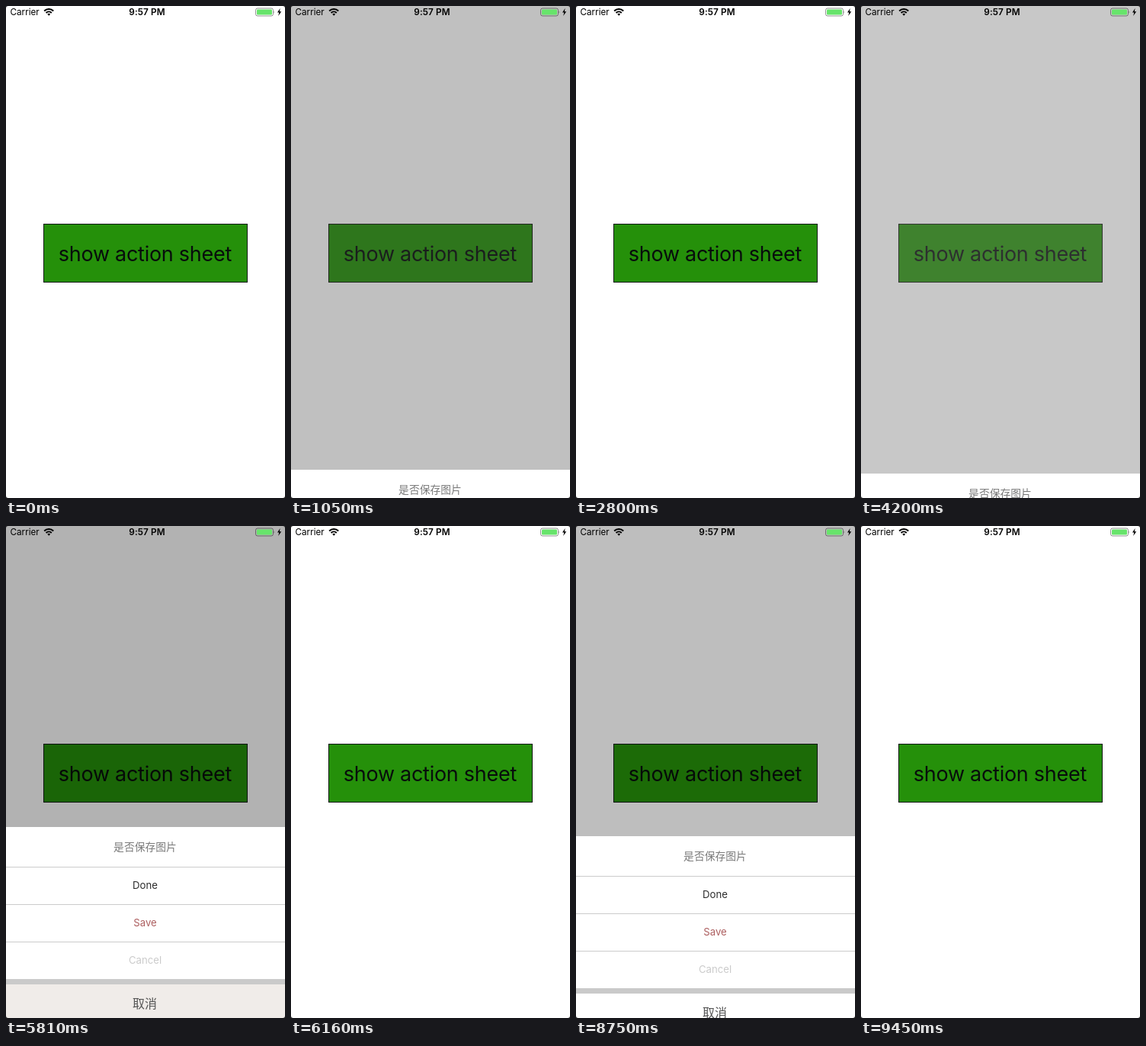
These frames come from a looping animation (366x644 px, 9.73 s). An HTML page:

```html
<!DOCTYPE html>
<html lang="en">
<head>
<meta charset="utf-8">
<title>Action sheet</title>
<style>
  html, body { margin: 0; width: 100%; height: 100%; overflow: hidden; background: #fff; }
  svg { display: block; width: 366px; height: 644px; }
  text { font-family: Inter, "Noto Sans CJK SC", "Noto Sans CJK", sans-serif; }
  .mid { text-anchor: middle; }
  .row { font-size: 13.2px; }
</style>
</head>
<body>
<svg viewBox="0 0 366 644">
  <rect width="366" height="644" fill="#fff"/>
  <g id="button">
    <rect x="49.5" y="285.5" width="267" height="76" fill="#25900a" stroke="#000" stroke-opacity=".88"/>
    <text class="mid" x="182.4" y="334" font-size="27" letter-spacing="-.28" fill="#080d0c">show action sheet</text>
  </g>
  <rect id="dim" width="366" height="644"/>

  <g id="sheet">
    <rect y="394" width="366" height="250" fill="#fff"/>
    <rect id="doneDown" y="447" width="366" height="48" fill="#f0ece9"/>
    <rect id="closeDown" y="600" width="366" height="44" fill="#f0ece9"/>
    <path d="M0 446.5H366M0 495.5H366M0 544.5H366" stroke="#ccc"/>
    <rect y="593" width="366" height="7" fill="#cacaca"/>
    <text class="mid" x="182.5" y="425.3" font-size="13.8" fill="#7a7a7a">是否保存图片</text>
    <text class="mid row" x="182.5" y="475" fill="#2c2c2c">Done</text>
    <text class="mid row" x="182.5" y="524" fill="#ad5f60">Save</text>
    <text class="mid row" x="182.5" y="573" fill="#cbcbcb">Cancel</text>
    <text class="mid" x="182" y="631" font-size="16" fill="#555">取消</text>
  </g>

  <g id="status">
    <text x="5.5" y="12" font-size="11.7">Carrier</text>
    <g fill="none" stroke="#000" stroke-width="2">
      <path d="M50.2 6.5A8.3 8.3 0 0 1 62.2 6.5M52.6 9A5.1 5.1 0 0 1 59.8 9"/>
    </g>
    <path d="M54.3 10.7a2.7 2.7 0 0 1 3.8 0L56.2 12.7z"/>
    <text class="mid" x="185" y="12" font-size="11.8" font-weight="600" letter-spacing=".1">9:57 PM</text>
    <rect x="327.5" y="3" width="23" height="10" rx="2.5" fill="none" stroke="#000" stroke-opacity=".42"/>
    <rect x="329" y="4.5" width="20" height="7" rx="1.2" fill="#67e46b"/>
    <path d="M351.5 6.3q1.6 1.7 0 3.4z" fill-opacity=".45"/>
    <path d="M359.6 3L356 8.4H358.3L357.2 13L361.2 7.2H358.8z"/>
  </g>
  <path fill="#222" fill-rule="evenodd" d="M0 0H366V644H0zM3 0Q0 0 0 3V641Q0 644 3 644H363Q366 644 366 641V3Q366 0 363 0z"/>
</svg>
<script>
const LOOP = 9730, TICK = 70;
// press: finger down, release: finger up, slide: sheet starts, close: sheet leaves
const runs = [
  { press: 770, release: 867, slide: 998, close: 2480 },
  { press: 3920, release: 4038, slide: 4152, close: 5885 },
  { press: 7000, release: 7085, slide: 7210, close: 8710 }
];
const el = id => document.getElementById(id);
const button = el('button'), dim = el('dim'), sheet = el('sheet');
const progress = (t, start, length) => Math.min(1, Math.max(0, (t - start) / length));
const ease = p => p < .5 ? 2 * p * p : 1 - 2 * (1 - p) ** 2;
const showBetween = (id, t, from, to) =>
  el(id).setAttribute('visibility', t >= from && t < to ? 'visible' : 'hidden');

function draw(t) {
  const run = runs.findLast(r => t >= r.press);
  let opacity = 1, shade = 0, raised = 0;
  if (run) {
    const closing = progress(t, run.close, 260);
    opacity = .2 + .8 * ease(progress(t, run.release, 250));
    shade = progress(t, run.release, 225) * (1 - closing);
    raised = ease(progress(t, run.slide, 190)) * (1 - ease(closing));
  }
  button.setAttribute('opacity', opacity);
  dim.setAttribute('opacity', .302 * shade);
  sheet.setAttribute('transform', `translate(0 ${Math.round(250 * (1 - raised))})`);
  showBetween('doneDown', t, 2310, 2590);
  showBetween('closeDown', t, 5810, 6020);
}

function frame() {
  const t = performance.now() % LOOP;
  draw(Math.floor(t / TICK) * TICK);
  requestAnimationFrame(frame);
}
frame();
</script>
</body>
</html>
```
